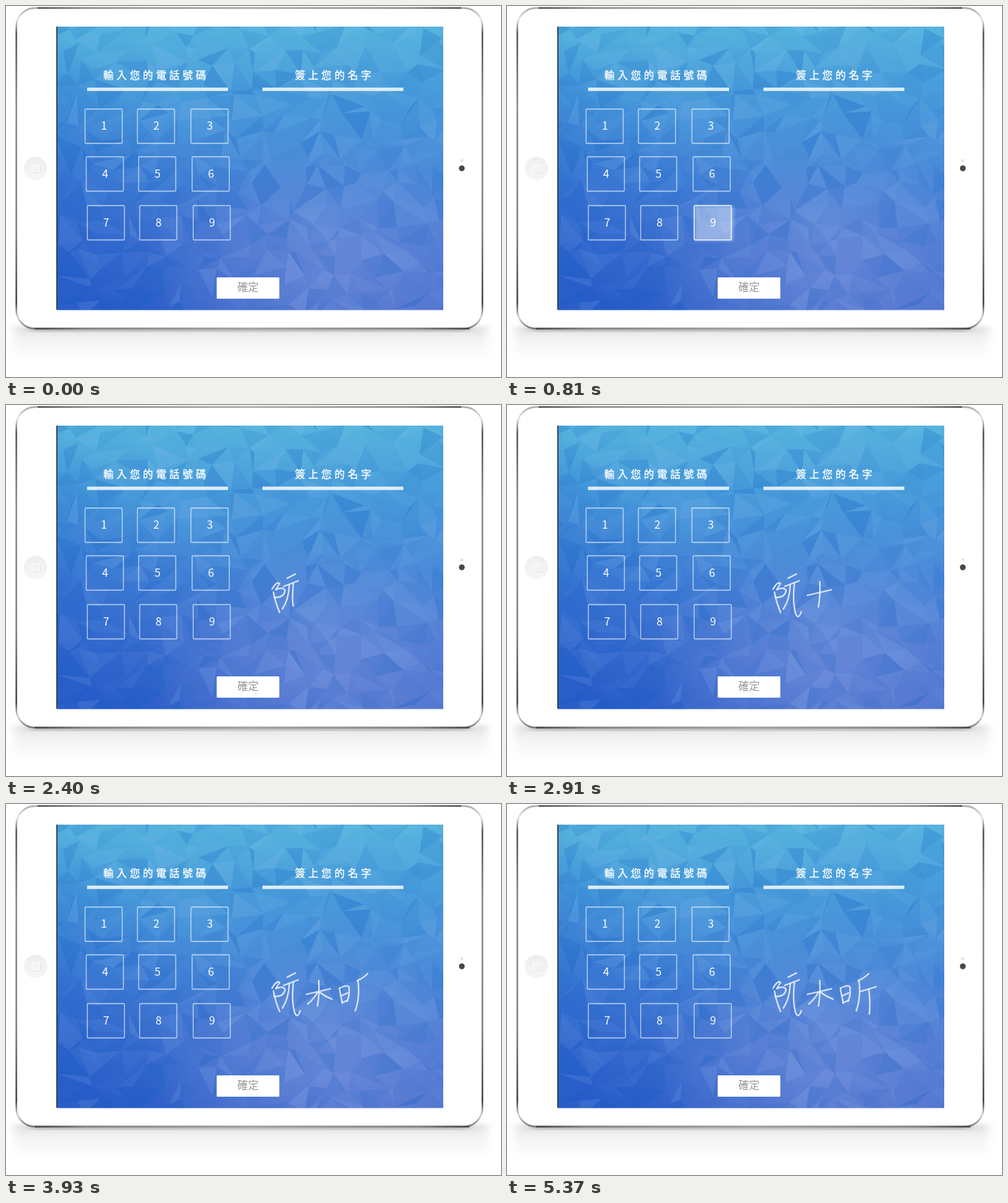
Animation of 720 by 540 pixels, one loop 5.4 s. Source, as an HTML page:

```html
<!DOCTYPE html>
<html lang="zh-Hant">
<head>
<meta charset="utf-8">
<style>
  html, body { margin: 0; width: 100%; height: 100%; overflow: hidden; background: #fff; }
  svg { display: block; width: 100vw; height: 100vh; }
  text { font-family: "Noto Sans CJK TC", "Noto Sans CJK", "Noto Sans", sans-serif; fill: #fff; }
  .title { font-size: 15px; letter-spacing: 4.2px; stroke: #fff; stroke-width: .35px; }
  .digit { font-size: 16px; text-anchor: middle; }
  .ink { fill: none; stroke: #f4f8ff; stroke-opacity: .82; stroke-width: 2.2; stroke-linecap: round; stroke-linejoin: round; }
</style>
</head>
<body>
<svg viewBox="0 0 720 540">
  <defs>
    <linearGradient id="sky" x2="0" y2="1">
      <stop offset="0" stop-color="#55b3dd"/>
      <stop offset=".25" stop-color="#489ada"/>
      <stop offset=".55" stop-color="#4986d7"/>
      <stop offset=".8" stop-color="#4d79d2"/>
      <stop offset="1" stop-color="#4a70ce"/>
    </linearGradient>
    <linearGradient id="deep" x1="0" y1=".85" x2=".42" y2=".45">
      <stop offset="0" stop-color="#0c4cc4" stop-opacity=".55"/>
      <stop offset="1" stop-color="#0c4cc4" stop-opacity="0"/>
    </linearGradient>
    <radialGradient id="haze" cx=".68" cy=".86" r=".45">
      <stop offset="0" stop-color="#8297dc" stop-opacity=".55"/>
      <stop offset="1" stop-color="#8297dc" stop-opacity="0"/>
    </radialGradient>
    <linearGradient id="rim" x2="0" y2="1">
      <stop offset="0" stop-color="#aaa"/>
      <stop offset=".035" stop-color="#e6e6e6"/>
      <stop offset=".08" stop-color="#555"/>
      <stop offset=".3" stop-color="#8c8c8c"/>
      <stop offset=".7" stop-color="#808080"/>
      <stop offset=".92" stop-color="#444"/>
      <stop offset=".965" stop-color="#d4d4d4"/>
      <stop offset="1" stop-color="#777"/>
    </linearGradient>
    <linearGradient id="edge">
      <stop offset="0" stop-color="#444"/>
      <stop offset=".12" stop-color="#888"/>
      <stop offset=".5" stop-color="#aaa"/>
      <stop offset=".88" stop-color="#888"/>
      <stop offset="1" stop-color="#444"/>
    </linearGradient>
    <linearGradient id="floor" x2="0" y2="1">
      <stop offset="0" stop-color="#000" stop-opacity=".13"/>
      <stop offset=".35" stop-color="#000" stop-opacity=".05"/>
      <stop offset="1" stop-color="#000" stop-opacity="0"/>
    </linearGradient>
    <linearGradient id="knob" x2="0" y2="1">
      <stop offset="0" stop-color="#eee"/>
      <stop offset="1" stop-color="#f6f6f6"/>
    </linearGradient>
    <filter id="blur" x="-30%" y="-30%" width="160%" height="160%"><feGaussianBlur stdDeviation="2.2"/></filter>
    <filter id="soft" x="-10%" y="-40%" width="120%" height="180%"><feGaussianBlur stdDeviation="7 3"/></filter>
    <clipPath id="glass"><rect x="74" y="30" width="562" height="412.500"/></clipPath>
  </defs>

  <rect x="12" y="466" width="688" height="52" fill="url(#floor)" filter="url(#soft)"/>
  <rect x="36" y="466" width="636" height="6" fill="#000" opacity=".35" filter="url(#soft)"/>
  <rect x="15" y="3" width="678" height="466.500" rx="27" fill="#fff" stroke="url(#rim)" stroke-width="2.4"/>
  <rect x="46" y="1.800" width="616" height="2" fill="url(#edge)"/>
  <rect x="42" y="468.500" width="632" height="2.200" fill="url(#edge)"/>

  <circle cx="43" cy="236.500" r="17" fill="url(#knob)"/>
  <rect x="38" y="231.500" width="10.500" height="10" rx="2" fill="#f3f3f3" stroke="#fff" stroke-width="1.200"/>
  <path d="M39 242.500h9q1.500 0 1.500-2v-7" fill="none" stroke="#e0e0e0"/>
  <circle cx="663" cy="225" r="2.200" fill="#e4e4e4"/>
  <circle cx="663" cy="236.300" r="4.200" fill="#48484a"/>

  <g clip-path="url(#glass)">
    <rect x="74" y="30" width="562" height="413" fill="url(#sky)"/>
    <rect x="74" y="30" width="562" height="413" fill="url(#deep)"/>
    <rect x="74" y="30" width="562" height="413" fill="url(#haze)"/>
    <g id="mesh"></g>
  </g>
  <path d="M74 30V442" stroke="#333e4c" stroke-width="1.800"/>

  <text class="title" x="141.500" y="106">輸入您的電話號碼</text>
  <text class="title" x="420.200" y="106">簽上您的名字</text>
  <path d="M118 121.300h205M373 121.300h205" stroke="#fff" stroke-opacity=".82" stroke-width="5"/>
  <g id="keys"></g>
  <g id="pen"></g>
  <rect x="306.500" y="395" width="91" height="31" rx="1" fill="#fff"/>
  <text x="352" y="415" font-size="15.500" text-anchor="middle" style="fill:#969696">確定</text>
</svg>

<script>
const LOOP = 5400, STEP = 30;

function add(parent, tag, attrs, text = '') {
  const el = document.createElementNS('http://www.w3.org/2000/svg', tag);
  for (const k in attrs) el.setAttribute(k, attrs[k]);
  el.textContent = text;
  document.getElementById(parent).append(el);
  return el;
}

// Faceted backdrop: a jittered grid cut into tinted triangles
let seed = 41;
const rand = () => (seed = seed * 16807 % 2147483647) / 2147483647;
const COLS = 21, ROWS = 18, grid = [];
for (let r = 0; r <= ROWS; r++)
  for (let c = 0; c <= COLS; c++)
    grid.push([(52 + c * 29 + (rand() - .5) * 28).toFixed(1), (14 + r * 25 + (rand() - .5) * 23).toFixed(1)]);

function facet(...ids) {
  const dark = rand() < .5;
  add('mesh', 'polygon', {
    points: ids.map(i => grid[i]).join(' '),
    fill: dark ? '#0f5cc0' : '#a8ccf4',
    opacity: (rand() ** 2 * (dark ? .24 : .14)).toFixed(3)
  });
}
for (let r = 0; r < ROWS; r++)
  for (let c = 0; c < COLS; c++) {
    const a = r * (COLS + 1) + c, b = a + 1, d = a + COLS + 1, e = d + 1;
    if (rand() < .5) { facet(a, b, d); facet(b, e, d); }
    else { facet(a, b, e); facet(a, e, d); }
  }

// Keypad
const rows = [[115, 150], [116.7, 219.5], [118.3, 290.5]], gaps = [0, 76.2, 154];
const glows = [];
for (let n = 0; n < 9; n++) {
  const [left, y] = rows[n / 3 | 0], x = left + gaps[n % 3];
  const box = { x, y, width: 54, height: 50, rx: 1 };
  glows[n + 1] = [
    add('keys', 'rect', { ...box, x: x + 1, y: y + .5, width: 56, height: 51, fill: '#fff', 'fill-opacity': .34, filter: 'url(#blur)' }),
    add('keys', 'rect', { ...box, fill: '#fff', 'fill-opacity': .1, stroke: '#fff' })
  ];
  add('keys', 'rect', { ...box, fill: 'none', stroke: '#fff', 'stroke-opacity': .66, 'stroke-width': 1.3 });
  add('keys', 'text', { class: 'digit', x: x + 27.5, y: y + 30 }, n + 1);
}

// key: rise start, rise end, fall start, fall end
const presses = { 5: [0, 30, 30, 60], 8: [30, 60, 330, 420], 3: [390, 480, 720, 810], 9: [720, 810, 1110, 1140] };

// Pen strokes: start, end, path
const strokes = [
  [1170, 1500, 'M387 268Q394 256 398 260Q394 266 392 269Q403 264 406 270Q404 281 390 280'],
  [1530, 1710, 'M389 272Q391 285 398 302'],
  [1740, 1860, 'M409 252L421 246'],
  [1890, 2010, 'M404 264L425 256'],
  [2040, 2220, 'M412 262Q411 284 402 297'],
  [2250, 2520, 'M418 260Q415 288 420 304Q424 313 428 301'],
  [2580, 2700, 'M437 277L472 269'],
  [2730, 2880, 'M455 257Q456 278 453 294'],
  [2910, 3030, 'M453 274Q447 285 439 291'],
  [3060, 3180, 'M456 274Q464 280 474 284'],
  [3240, 3330, 'M485 269L489 290'],
  [3360, 3510, 'M485 268Q500 261 499 269Q500 279 496 287'],
  [3540, 3600, 'M488 279L497 275'],
  [3630, 3690, 'M489 289L497 286'],
  [3720, 3780, 'M526 247Q519 254 511 257'],
  [3810, 3930, 'M512 257Q515 282 508 301'],
  [4200, 4380, 'M514 273L537 266'],
  [4470, 4800, 'M526 269Q529 287 527 306']
].map(([from, to, d]) => ({ from, to, el: add('pen', 'path', { class: 'ink', d, pathLength: 1 }) }));

const ramp = (t, a, b) => Math.min(1, Math.max(0, (t - a) / (b - a)));

function draw(now) {
  const t = Math.floor(now % LOOP / STEP) * STEP;
  glows.forEach((parts, n) => {
    const p = presses[n];
    const level = p ? Math.min(ramp(t, p[0], p[1]), 1 - ramp(t, p[2], p[3])) : 0;
    parts.forEach(el => el.setAttribute('opacity', level));
  });
  for (const { from, to, el } of strokes) {
    const p = ramp(t, from, to);
    el.setAttribute('visibility', p ? 'visible' : 'hidden');
    el.setAttribute('stroke-dasharray', p + ' 2');
  }
}

const begin = performance.now();
function tick() {
  draw(performance.now() - begin);
  requestAnimationFrame(tick);
}
tick();
</script>
</body>
</html>
```
